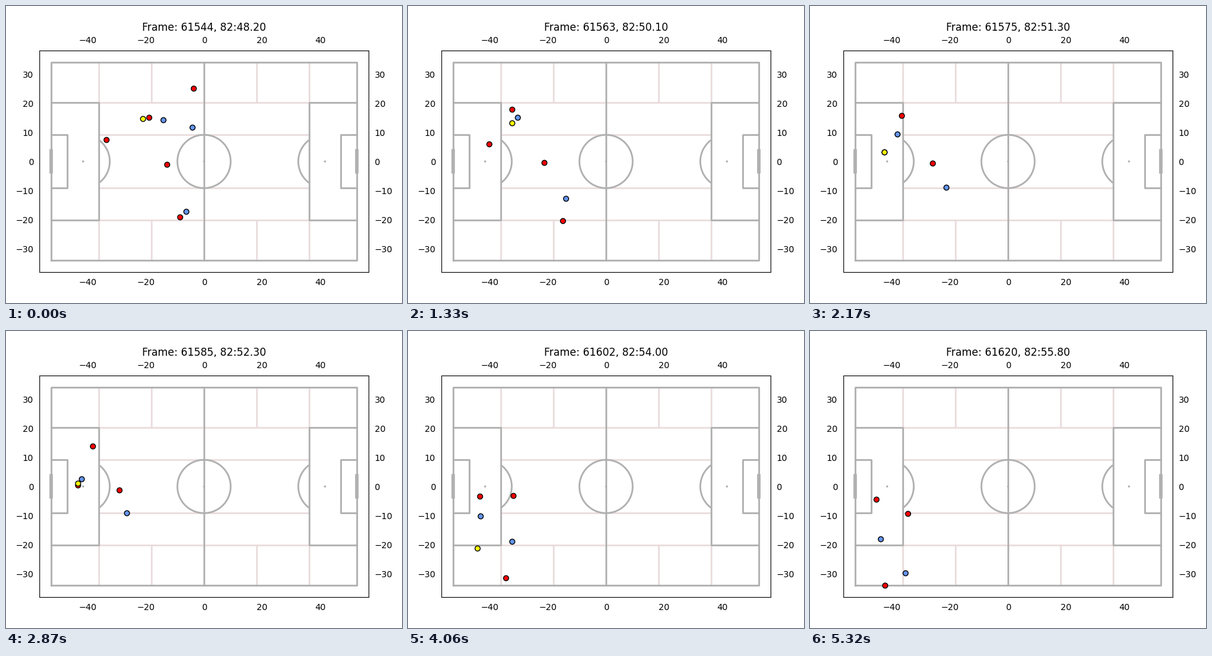
Recreate the animation shown at these times as a matplotlib script. Size 640 px wide and 480 px high, loop 6090 ms.

```python
import math

import matplotlib.pyplot as plt
import numpy as np
from matplotlib.animation import FuncAnimation
from matplotlib.patches import Arc, Circle

W, H, DPI = 640, 480, 100
SCALE = 4.705                # pixels per metre
CX, CY = 320.05, 251.25      # centre spot on the stage, from the top left
XLIM, YLIM = 56.5, 38
STEPS, LAST, INTERVAL = 87, 76, 70
FIRST_COUNT, FIRST_TIME = 61544, 48.2

LINE, ZONE = "#b0b0b0", "#eadddd"
RED, BLUE, BALL = "red", "cornflowerblue", "yellow"

fig = plt.figure(figsize=(W / DPI, H / DPI), dpi=DPI, facecolor="white")
ax = fig.add_axes([(CX - XLIM * SCALE) / W, (H - CY - YLIM * SCALE) / H,
                   2 * XLIM * SCALE / W, 2 * YLIM * SCALE / H])
ax.set_xlim(-XLIM, XLIM)
ax.set_ylim(-YLIM, YLIM)
ax.set_xticks(range(-40, 41, 20))
ax.set_yticks(range(-30, 31, 10))
ax.tick_params(left=False, right=False, top=False, bottom=False,
               labelleft=True, labelright=True, labeltop=True, labelbottom=True)


def line(xs, ys, color=LINE, width=2):
    ax.plot(xs, ys, color=color, lw=width, zorder=0.8 if color == ZONE else 0.9)


def spot(x):
    ax.add_patch(Circle((x, 0), 0.21, color=LINE, zorder=0.9))


def draw_pitch():
    end, side = 52.5, 34
    box_x, box_y = end - 16.46, 20.16
    area_x, area_y = end - 5.49, 9.16
    spot_x, radius, goal = end - 10.97, 9.15, 3.66

    # positional zones
    for x in (-box_x, -box_x / 2, box_x / 2, box_x):
        line([x, x], [-side, -box_y], ZONE)
        line([x, x], [box_y, side], ZONE)
    for y in (-box_y, -area_y, area_y, box_y):
        line([-box_x, box_x], [y, y], ZONE)

    # markings
    line([-end, end, end, -end, -end], [-side, -side, side, side, -side])
    line([0, 0], [-side, side])
    ax.add_patch(Circle((0, 0), radius, fill=False, ec=LINE, lw=2, zorder=0.9))
    spot(0)
    half_angle = math.degrees(math.acos((spot_x - box_x) / radius))
    for s in (-1, 1):
        for x, y in ((box_x, box_y), (area_x, area_y)):
            line([s * end, s * x, s * x, s * end], [-y, -y, y, y])
        line([s * end, s * end], [-goal, goal], width=4)
        spot(s * spot_x)
        ax.add_patch(Arc((s * spot_x, 0), 2 * radius, 2 * radius, angle=90 + 90 * s,
                         theta1=-half_angle, theta2=half_angle,
                         ec=LINE, lw=2, zorder=0.9))


def smooth(t, times, values):
    """Cubic Hermite curve through the given values."""
    slopes = np.gradient(values, times)
    i = min(max(int(np.searchsorted(times, t, side="right")) - 1, 0), len(times) - 2)
    h = times[i + 1] - times[i]
    u = (t - times[i]) / h
    return ((1 + 2 * u) * (1 - u) ** 2 * values[i] + u * (1 - u) ** 2 * h * slopes[i]
            + u * u * (3 - 2 * u) * values[i + 1] + u * u * (u - 1) * h * slopes[i + 1])


class Mover:
    """A dot on a path of stage points, hidden before and after it."""

    def __init__(self, color, times, points, curve):
        self.times, self.curve = times, curve
        xs, ys = np.array(points, float).T
        self.xs, self.ys = (xs - CX) / SCALE, (CY - ys) / SCALE
        self.dot, = ax.plot([], [], "o", color=color, ms=6, mec="black", mew=1)

    def move(self, t):
        if self.times[0] <= t <= self.times[-1]:
            self.dot.set_data([self.curve(t, self.times, self.xs)],
                              [self.curve(t, self.times, self.ys)])
        else:
            self.dot.set_data([], [])


def runner(color, start, end, *points):
    """A player who passes the points at even intervals."""
    return Mover(color, np.linspace(start, end, len(points)), points, smooth)


draw_pitch()

movers = [
    runner(BLUE, 0, 5, (301, 196), (288, 192)),
    runner(BLUE, 0, LAST, (254, 184), (177, 180), (126, 229), (117, 296), (114, 336)),
    runner(BLUE, 0, LAST, (291, 332), (255, 311), (201, 290), (169, 337), (154, 391)),
    runner(RED, 0, 5, (303, 133), (290, 133)),
    runner(RED, 0, 57, (231, 180), (168, 167), (142, 184), (141, 199)),
    runner(RED, 0, LAST, (162, 216), (131, 223), (117, 245), (116, 266), (107, 272)),
    runner(RED, 0, LAST, (260, 256), (220, 253), (187, 256), (171, 265), (158, 295)),
    runner(RED, 0, 26, (281, 341), (260, 343), (237, 353)),
    runner(RED, 52, LAST, (171, 390), (145, 406), (121, 411)),
    # the ball runs straight from touch to touch
    Mover(BALL, (0, 9, 19, 31, 43, 67),
          [(221, 182), (190, 177), (168, 189), (120, 236), (115, 248), (110, 413)],
          np.interp),
]
title = ax.set_title("")


def update(step):
    t = min(step, LAST)
    title.set_text(f"Frame: {FIRST_COUNT + t}, 82:{FIRST_TIME + t / 10:05.2f}")
    for mover in movers:
        mover.move(t)
    return [title] + [m.dot for m in movers]


anim = FuncAnimation(fig, update, frames=STEPS, interval=INTERVAL,
                     repeat=True, repeat_delay=0, blit=False)
plt.show()
```
